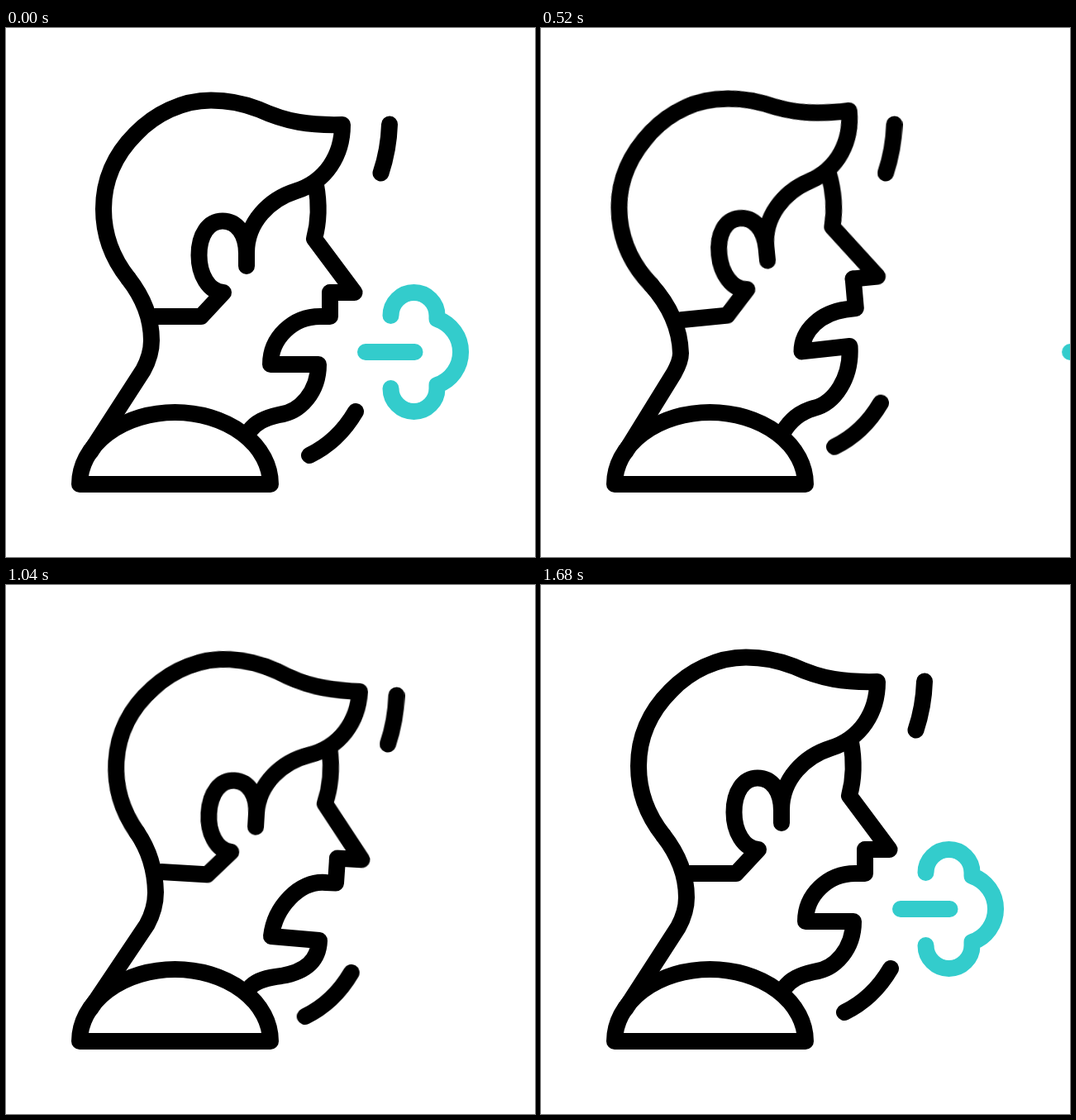
Animation of 640 by 640 pixels, one loop 1.72 s. Source, as an HTML page without scripts:

```html
<!DOCTYPE html>
<html lang="en">
<head>
<meta charset="utf-8">
<title>Coughing man</title>
<style>
  html, body { margin: 0; width: 100%; height: 100%; overflow: hidden; background: #fff; }
  svg { display: block; width: 100vw; height: 100vh; }
  path { fill: none; stroke: #000; stroke-width: 20; stroke-linecap: round; stroke-linejoin: round; }
  .breath path { stroke: #33cccc; }

  .head, .neck, .mouth, .arc, .breath, .cloud {
    animation: 1720ms cubic-bezier(.333, 0, .667, 1) infinite;
  }

  .head { transform-origin: 217px 460px; animation-name: nod; }
  @keyframes nod {
    0%, 88.37%, 100% { transform: translateX(0) rotate(0deg); }
    23.26%, 34.88% { transform: translateX(.3px) rotate(-5.64deg); }
    51.16%, 65.12% { transform: translateX(1px) rotate(3.39deg); }
  }

  /* the neck and jaw bend, because their lower ends stay on the collar */
  .neck { animation-name: neck; }
  @keyframes neck {
    0%, 88.37%, 100% { d: path("M148 303 C166 326 176 351 176 378 C176 391 172 403 166 414 L102 513"); }
    23.26%, 34.88% { d: path("M133.2 310.6 C152 331.6 168 359 169 393.6 C169 401 166 408.5 161 417.5 L102 513"); }
    51.16%, 65.12% { d: path("M158.4 299.2 C174 322 180.5 345 181 372 C181 385 177 399 170.5 411 L102 513"); }
  }

  .mouth { animation-name: mouth; }
  @keyframes mouth {
    0%, 88.37%, 100% { d: path("M392 320 L392 349 L380 349 C347 349 320 375 320 407 L378 407 C378 440 356 465 330 468 C313 472 302 477 294 488"); }
    23.26%, 34.88% { d: path("M377.7 303.4 L380.8 339 L368.8 340.5 C339 344.5 315.5 365.5 315.5 391.4 L373.5 385 C375.8 423.3 355 454 330 460 C312 465 300 477 293 489"); }
    51.16%, 65.12% { d: path("M401 331 L399 360.5 L387 360 C355 357 325 390 321 425 L379 430 C378 455 362 468 333 473 C316 475 304 478 296 486"); }
  }

  .arc { animation-name: arc; }
  .upper { --back: -36.5px, 0px; --forth: 8.5px, 17px; }
  .lower { --back: -12px, -10.4px; --forth: -5.3px, 5px; }
  @keyframes arc {
    0%, 5.81%, 90.7%, 100% { transform: translate(0, 0); }
    29.07%, 37.21% { transform: translate(var(--back)); }
    53.49%, 67.44% { transform: translate(var(--forth)); }
  }

  .breath { animation-name: drift, appear; }
  @keyframes drift {
    0%, 12.79%, 84.88%, 100% { transform: translateX(0); }
    37.21%, 60.46% { transform: translateX(255px); }
    60.47% { transform: translateX(-84px); }
  }
  @keyframes appear {
    0%, 37.21%, 67.44%, 100% { opacity: 1; }
    37.22%, 60.47% { opacity: 0; }
  }

  .cloud { vector-effect: non-scaling-stroke; transform-origin: 466px 392px; animation-name: grow; }
  @keyframes grow {
    0%, 12.79%, 84.88%, 100% { transform: scale(1); }
    37.21%, 60.46% { transform: scale(1.7); }
    60.47% { transform: scale(.867); }
  }
</style>
</head>
<body>
<svg viewBox="0 0 640 640">
  <path class="arc upper" d="M464 116.5 Q463 147 453.5 175.5"/>
  <path class="arc lower" d="M423 464 Q402 500 367 517"/>

  <g class="breath">
    <path d="M435 392 H494.5"/>
    <path class="cloud" d="M465.5 348 A28 28 0 0 1 521.5 348 V352 A42.3 42.3 0 0 1 521.5 432 V436 A28 28 0 0 1 465.5 436"/>
  </g>

  <path d="M89 552 A115.5 87 0 0 1 320 552 Z"/>
  <path class="neck" d="M148 303 C166 326 176 351 176 378 C176 391 172 403 166 414 L102 513"/>
  <path class="mouth" d="M392 320 L392 349 L380 349 C347 349 320 375 320 407 L378 407 C378 440 356 465 330 468 C313 472 302 477 294 488"/>

  <g class="head">
    <!-- hairline, ear, fringe and back of the head -->
    <path d="M180 349 H236 L263 320 C245 319 233.5 298 233.5 275 C233.5 250 245 233.5 262 233.5
             C280 233.5 291 250 291 273 V288 V272 C291 234 320 207 350 197.5 C387 186 407 154 407 117
             C367 118 340 114 306 98.5 C287 91 268 87.5 248 87.5
             C213 87.5 180 104 157 128 C131 154 118 185 118 219 C118 250 129 279 148 303"/>
    <!-- forehead and nose -->
    <path d="M375 190 C379 212 379 233 373 255 L421.5 320 H392"/>
  </g>
</svg>
</body>
</html>
```
